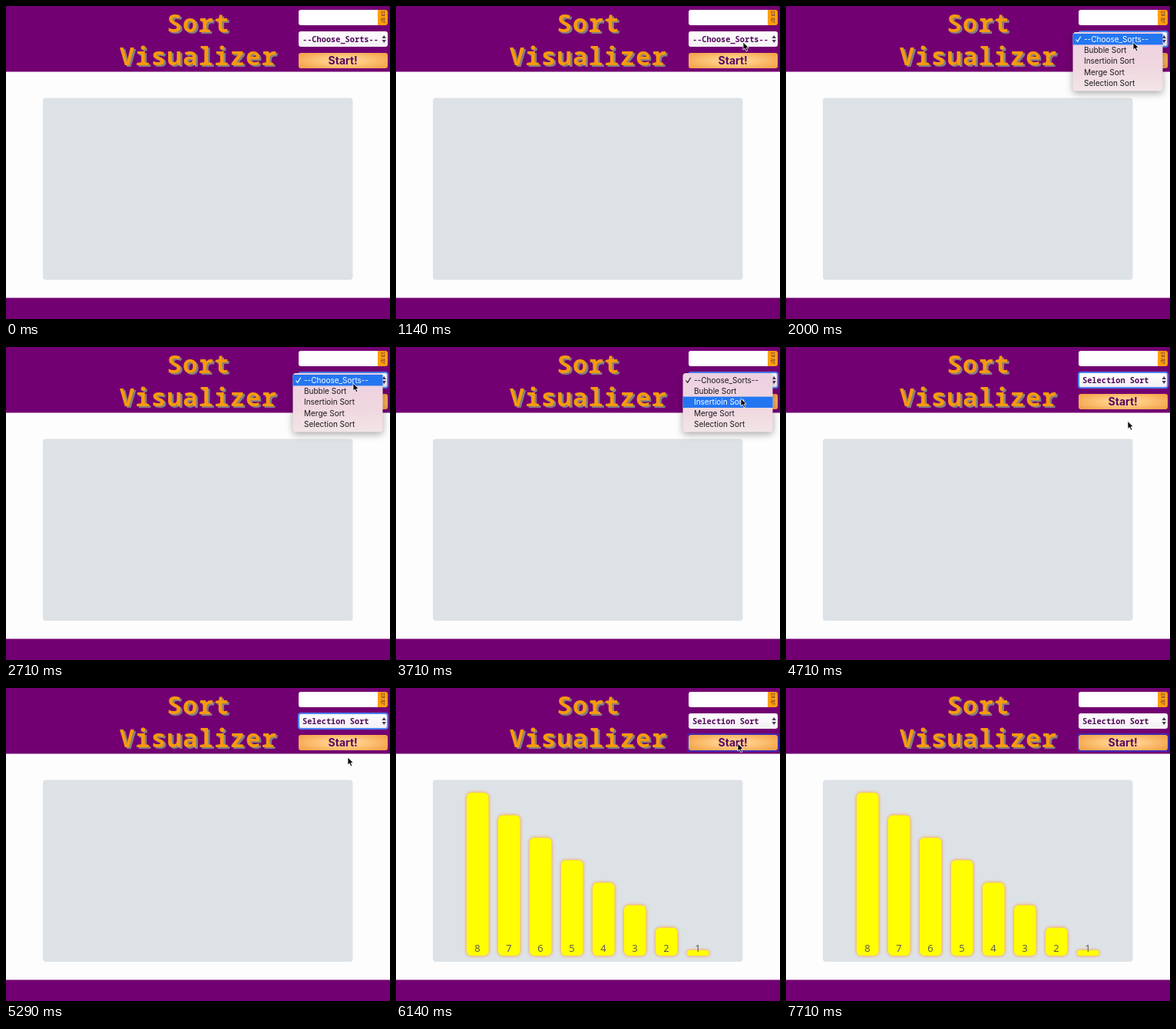
Animation of 500x407 px, one loop 8 s. Source, as an HTML page:

```html
<!DOCTYPE html>
<html lang="en">
<head>
<meta charset="utf-8">
<title>Sort Visualizer</title>
<style>
  html, body { margin: 0; width: 100%; height: 100%; overflow: hidden; background: #fefdfe; }
  svg { display: block; }
  .mono { font-family: "Noto Sans Mono", "DejaVu Sans Mono", monospace; font-weight: 600; }
  .title { font-size: 32.4px; letter-spacing: 1.1px; text-anchor: middle; fill: #f79a0c; }
  .value { font-size: 10.3px; fill: #4f0858; }
  .start { font: 700 14px Inter, sans-serif; text-anchor: middle; fill: #5a0860; }
  .input { font: 500 7px "Noto Sans CJK KR", "Noto Sans CJK", sans-serif; text-anchor: middle; fill: #55304a; }
  .item { font: 10px Inter, sans-serif; fill: #1c181c; }
  .item.on { fill: #fff; }
  .label { font: 13px "Open Sans", "Noto Sans", sans-serif; text-anchor: middle; fill: #555; }
  .bar { fill: #ff0; filter: drop-shadow(0 0 2px #ff8c28); }
  .menuBox { filter: drop-shadow(0 3px 5px #0005); }
</style>
</head>
<body>
<svg width="500" height="407" viewBox="0 0 500 407">
  <defs>
    <radialGradient id="amber" gradientTransform="translate(.5 .5) scale(1.15 1.3) translate(-.5 -.5)">
      <stop offset=".35" stop-color="#ffcd87"/><stop offset="1" stop-color="#f5a64c"/>
    </radialGradient>
    <linearGradient id="blush" x2="0" y2="1">
      <stop stop-color="#ecd0e2"/><stop offset=".6" stop-color="#f0d7df"/><stop offset="1" stop-color="#f2e5e7"/>
    </linearGradient>
    <linearGradient id="pale" x2="0" y2="1">
      <stop stop-color="#fff"/><stop offset="1" stop-color="#f3eef4"/>
    </linearGradient>
  </defs>
  <path d="M0 0H500V85.4H0ZM0 379.6H500V407H0Z" fill="#720072"/>
  <g class="mono title">
    <g fill="#858080" transform="translate(2.5 2)"><text x="250.5" y="34">Sort</text><text x="250.5" y="77">Visualizer</text></g>
    <text x="250.5" y="34">Sort</text><text x="250.5" y="77">Visualizer</text>
  </g>

  <path d="M484 5H494Q497 5 497 8V22Q497 25 494 25H484Z" fill="#ff9f0c"/>
  <path d="M384 5H484V25H384Q381 25 381 22V8Q381 5 384 5Z" fill="#fff"/>
  <text class="input" x="490.8" y="12.3">입</text><text class="input" x="490.8" y="21">력</text>

  <rect x="381" y="33" width="116" height="20" rx="3" fill="url(#pale)"/>
  <rect id="selectRing" x="381" y="33" width="116" height="20" rx="3" fill="none" stroke="#4a83f5" stroke-width="2"/>
  <text id="value" class="mono value" x="386" y="46.7"></text>
  <path d="M489.5 42L492.2 38L494.9 42ZM489.5 44L492.2 48L494.9 44Z" fill="#4f3558"/>

  <rect x="381" y="61" width="116" height="20" rx="3" fill="url(#amber)"/>
  <rect id="startRing" x="380" y="60" width="118" height="22" rx="3" fill="none" stroke="#4129b5" stroke-width="2"/>
  <text class="start" x="438.7" y="76">Start!</text>

  <rect x="48" y="119.5" width="403.5" height="236.5" rx="4" fill="#dde2e6"/>
  <g id="bars"></g>

  <g id="menu">
    <rect class="menuBox" x="373.5" y="34" width="117" height="76.5" rx="4" fill="url(#blush)"/>
    <rect id="highlight" x="373.5" width="117" height="14.4" fill="#2376f2"/>
    <g id="items"></g>
    <path id="check" d="M377.5 43.5L379.7 46.3L383.7 39.8" fill="none" stroke-width="1.2"/>
  </g>
  <path id="cursor" d="M0 0V10L2.3 8L4 11.8L5.8 11L4.2 7.3H7.2Z" fill="#000" stroke="#fff" stroke-width=".8"/>
</svg>
<script>
const LOOP = 8000, STEP = 1000 / 7, ROW = 14.3;
const OPEN = 2000, CHOSEN = 4570, PRESSED = 5710, FILLED = 6000;
const options = ["--Choose_Sorts--", "Bubble Sort", "Insertioin Sort", "Merge Sort", "Selection Sort"];
// time, x, y of the pointer
const path = [
  [0, 512, 26], [140, 502, 27], [1000, 455, 45], [1140, 452, 47], [3000, 452, 47],
  [3290, 451, 56], [3570, 450, 59], [4290, 445, 98], [4570, 445, 98],
  [5290, 445, 90], [5570, 445, 72], [6290, 445, 72], [6860, 506, 64], [LOOP, 512, 64]
];
const $ = id => document.getElementById(id);
const show = (id, on) => $(id).style.display = on ? "" : "none";

$("items").innerHTML = options.map((name, i) =>
  `<text class="item" x="388" y="${46.7 + i * ROW}">${name}</text>`).join("");
$("bars").innerHTML = [8, 7, 6, 5, 4, 3, 2, 1].map((n, i) => {
  const x = 92 + i * 41, h = 7 + (n - 1) * 29.25;
  return `<rect class="bar" x="${x}" y="${348 - h}" width="28.5" height="${h}" rx="${Math.min(6, h / 2)}"/>
    <text class="label" x="${x + 14}" y="342.5">${n}</text>`;
}).join("");
const items = [...$("items").children];

function pointerAt(t) {
  const i = path.findIndex(p => p[0] > t);
  const [t0, x0, y0] = path[i - 1], [t1, x1, y1] = path[i];
  const k = (t - t0) / (t1 - t0);
  return [x0 + (x1 - x0) * k, y0 + (y1 - y0) * k];
}

function draw(time) {
  // the screen refreshes seven times a second
  const t = Math.floor((time % LOOP + 5) / STEP) * STEP % LOOP;
  const after = mark => t > mark - 5;
  const [x, y] = pointerAt(t);
  $("cursor").setAttribute("transform", `translate(${x} ${y})`);

  const row = Math.max(0, Math.min(4, Math.floor((y - 36) / ROW)));
  $("highlight").setAttribute("y", 36 + row * ROW);
  items.forEach((item, i) => item.classList.toggle("on", i === row));
  $("check").setAttribute("stroke", row ? "#1c181c" : "#fff");

  $("value").textContent = options[after(CHOSEN) ? 4 : 0];
  show("menu", after(OPEN) && !after(CHOSEN));
  show("selectRing", after(OPEN) && !after(PRESSED));
  show("startRing", after(PRESSED));
  show("bars", after(FILLED));
}

function tick() {
  draw(performance.now());
  requestAnimationFrame(tick);
}
tick();
</script>
</body>
</html>
```
